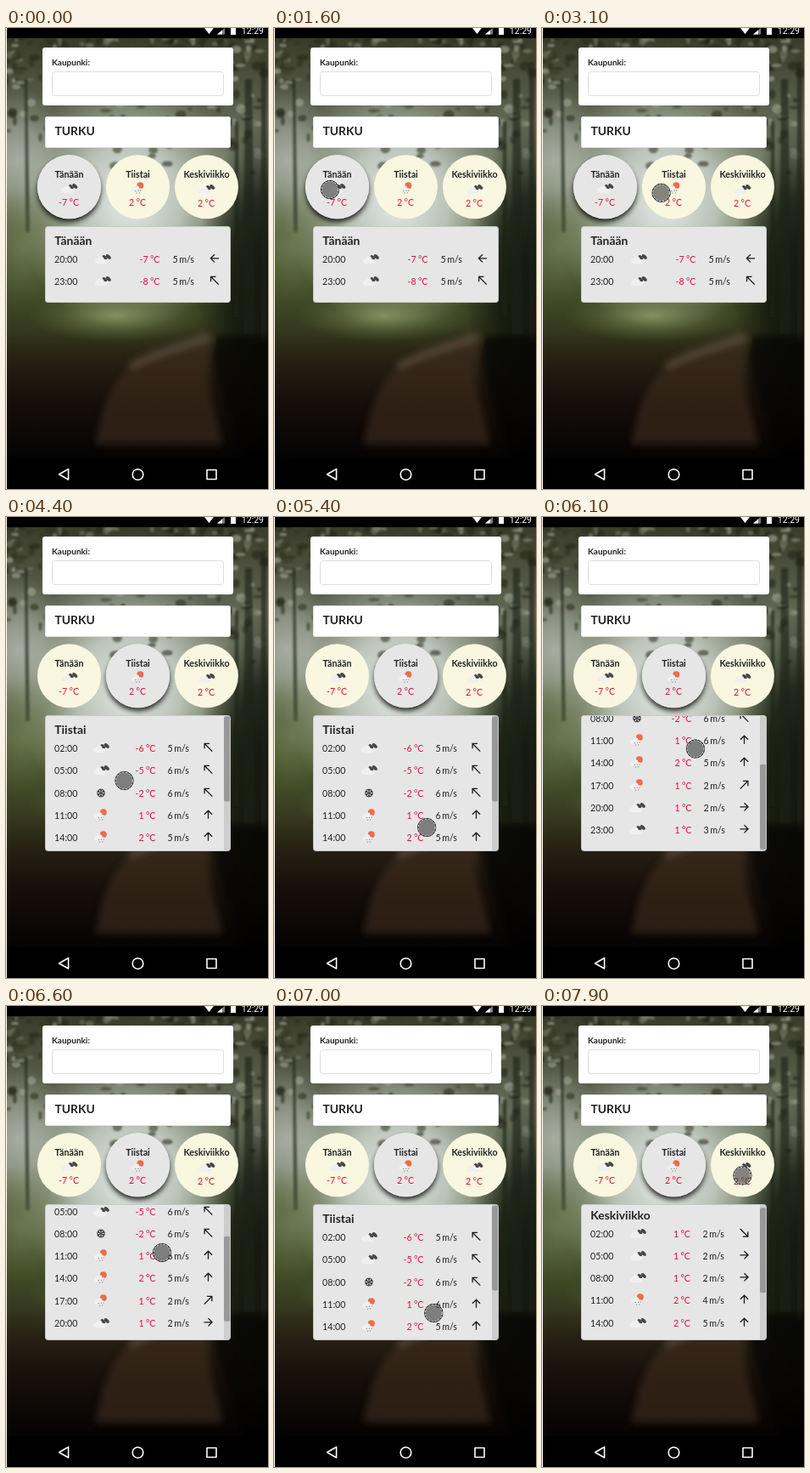
An HTML page for the animation above (8000 ms loop, 309 by 542 pixels).

```html
<!DOCTYPE html>
<html lang="fi">
<head>
<meta charset="utf-8">
<title>Sää</title>
<style>
  html, body { margin: 0; width: 100%; height: 100%; overflow: hidden; background: #000; }
  svg { display: block; }
  text { font: 10.7px Lato, sans-serif; fill: #222; }
  .bold { font-weight: 700; }
  .big { font-size: 13.9px; font-weight: 700; }
  .temp { fill: #dc143c; word-spacing: -.5px; }
  .wind { word-spacing: -1.3px; }
  .end { text-anchor: end; }
  .mid { text-anchor: middle; }
  .arrow { fill: none; stroke: #1a1a1a; stroke-width: 1.3; }
  .nav { fill: none; stroke: #fff; stroke-width: 1.6; stroke-linejoin: round; }
</style>
</head>
<body>
<svg id="stage" width="309" height="542" viewBox="0 0 309 542">
  <defs>
    <linearGradient id="base" gradientUnits="userSpaceOnUse" x1="0" y1="12" x2="0" y2="506">
      <stop offset="0" stop-color="#3a3c2a"/>
      <stop offset=".17" stop-color="#5c604e"/>
      <stop offset=".3" stop-color="#737a66"/>
      <stop offset=".45" stop-color="#5d684a"/>
      <stop offset=".6" stop-color="#434d29"/>
      <stop offset=".69" stop-color="#363a1f"/>
      <stop offset=".76" stop-color="#272214"/>
      <stop offset=".86" stop-color="#170f0a"/>
      <stop offset="1" stop-color="#050303"/>
    </linearGradient>
    <radialGradient id="mist">
      <stop offset="0" stop-color="#e6ecea"/>
      <stop offset=".45" stop-color="#d0d7d0" stop-opacity=".8"/>
      <stop offset="1" stop-color="#aab49c" stop-opacity="0"/>
    </radialGradient>
    <radialGradient id="grass">
      <stop offset="0" stop-color="#8c9868" stop-opacity=".9"/>
      <stop offset="1" stop-color="#5d6e35" stop-opacity="0"/>
    </radialGradient>
    <radialGradient id="shade">
      <stop offset="0" stop-color="#10130b" stop-opacity=".95"/>
      <stop offset=".55" stop-color="#10130b" stop-opacity=".75"/>
      <stop offset="1" stop-color="#10130b" stop-opacity="0"/>
    </radialGradient>
    <filter id="soft" x="-30%" y="-30%" width="160%" height="160%"><feGaussianBlur stdDeviation="4"/></filter>
    <filter id="fine" x="-30%" y="-30%" width="160%" height="160%"><feGaussianBlur stdDeviation=".8"/></filter>
    <filter id="shadow" x="-30%" y="-30%" width="160%" height="160%"><feGaussianBlur stdDeviation="3"/></filter>
    <clipPath id="photoClip"><rect x="1" y="12" width="308" height="494"/></clipPath>
    <clipPath id="listClip"><rect x="47" y="234" width="217" height="158" rx="2"/></clipPath>

    <g id="pale" fill="#f0f0f0">
      <circle cx="-6" cy="2.6" r="3"/><circle cx="-2.2" cy=".8" r="3.7"/><circle cx="2.6" cy="3" r="2.6"/>
      <rect x="-6" y="2" width="9" height="3.6"/>
    </g>
    <g id="cloud">
      <g fill="#454547">
        <ellipse rx="3.2" ry="1.9" transform="translate(2.4 -1.8) rotate(38)"/>
        <ellipse rx="3.6" ry="2" transform="translate(6.8 -2.6) rotate(42)"/>
      </g>
      <use href="#pale"/>
    </g>
    <g id="rain">
      <circle cx="2.8" cy="-3.2" r="4" fill="#eb6e4b"/>
      <use href="#pale" transform="translate(.2 -.6) scale(.9)"/>
      <path d="M-2.4 2.4l-.6 1.2M.8 2.2l-.6 1.2M3.6 2l-.6 1.2M-1.2 5l-.5 1.1M2 4.8l-.5 1.1" stroke="#666" stroke-width=".9"/>
    </g>
    <g id="snow" fill="none" stroke="#3c3c3e" stroke-width="1.1">
      <path id="flake" d="M0-5V5M-2-4.6L0-2.6 2-4.6M-2 4.6L0 2.6 2 4.6"/>
      <use href="#flake" transform="rotate(60)"/><use href="#flake" transform="rotate(120)"/>
    </g>
    <path id="arrow" class="arrow" d="M0 5V-4.4M-4.6 0L0-4.6 4.6 0"/>
    <path id="diagonal" class="arrow" d="M0 6.8V-6M-4.2-2L0-6.2 4.2-2"/>
  </defs>

  <rect width="309" height="542" fill="#000"/>
  <g clip-path="url(#photoClip)">
    <rect y="12" width="309" height="494" fill="url(#base)"/>
    <ellipse cx="145" cy="205" rx="135" ry="150" fill="url(#mist)"/>
    <ellipse cx="15" cy="155" rx="60" ry="85" fill="url(#mist)" opacity=".45"/>
    <g id="leaves" filter="url(#fine)"></g>
    <ellipse cx="310" cy="300" rx="85" ry="190" fill="url(#shade)"/>
    <g filter="url(#fine)" fill="#1d2115" opacity=".6">
      <path d="M282 60h8l4 300h-14zM301 40h6v330h-6zM270 110h4l1 230h-6zM22 60h3l3 180h-5z"/>
    </g>
    <ellipse cx="130" cy="338" rx="105" ry="32" fill="url(#grass)"/>
    <ellipse cx="20" cy="260" rx="60" ry="75" fill="url(#grass)" opacity=".45"/>
    <g filter="url(#soft)">
      <path d="M238 362C215 374 170 382 140 404 116 430 112 460 105 490H255C250 450 224 410 246 362Z" fill="#403022" opacity=".6"/>
      <path d="M240 363C215 372 180 380 146 398" fill="none" stroke="#6d5b49" stroke-width="7" opacity=".7"/>
      <path d="M248 362H315V510H280C264 450 236 400 248 362Z" fill="#0b0906" opacity=".6"/>
    </g>
  </g>
  <rect width="1" height="542" fill="#fff"/>

  <g fill="#fff">
    <path d="M234 0h11l-5.5 7z"/>
    <path d="M249 7.5L258 0V7.5z" opacity=".5"/>
    <path d="M249 7.5L255 2.5V7.5z"/>
    <rect x="265" y="0" width="6" height="8"/>
    <text x="304" y="7.3" class="end" style="font:10.5px Roboto,sans-serif;fill:#fff">12:29</text>
  </g>
  <g class="nav">
    <path d="M73.6 518.5V531L62.6 524.8Z"/><circle cx="155.5" cy="525" r="6.3"/><rect x="237" y="519.5" width="11" height="11"/>
  </g>

  <rect x="43" y="23" width="225" height="68" rx="3" fill="#fff"/>
  <text x="54" y="44" class="bold" style="font-size:10px">Kaupunki:</text>
  <rect x="54.5" y="51.5" width="202" height="28" rx="3" fill="#fff" stroke="#ddd"/>
  <rect x="46" y="104" width="219" height="37" rx="3" fill="#fff"/>
  <rect x="46.5" y="104.5" width="218" height="36" rx="3" fill="none" stroke="#e2e2e2"/>
  <text x="57.4" y="126" class="big">TURKU</text>

  <g id="days"></g>

  <rect id="panel" x="46.5" y="233.5" width="218" height="89" rx="3" fill="#e6e6e6" stroke="#c9c9c9"/>
  <g clip-path="url(#listClip)">
    <g id="lists"></g>
    <g id="bar">
      <rect x="257" y="234" width="8" height="158" fill="#cdcdcd"/>
      <rect id="thumb" x="257" y="234.5" width="7.5" height="100" rx="2.5" fill="#999"/>
    </g>
  </g>

  <g id="touch">
    <circle r="10.8" fill="#464646" fill-opacity=".65"/>
    <circle r="10.6" fill="none" stroke="#1c1c1c" stroke-width="1"/>
    <circle r="9.9" fill="none" stroke="#eee" stroke-width=".9" stroke-dasharray="2 2"/>
  </g>
</svg>

<script>
const $ = id => document.getElementById(id);
const LOOP = 8000, STEP = 100, FADE = 300;
const PICK_TUE = 3400, PICK_WED = 7900;
const ROW = 26.3;

// rows: time, icon, temperature, wind, arrow angle
const days = [
  { name: 'Tänään', icon: 'cloud', temp: -7, cols: [114, 181.5, 222, 246], rows: [
    ['20:00', 'cloud', -7, 5, 270], ['23:00', 'cloud', -8, 5, 315]] },
  { name: 'Tiistai', icon: 'rain', temp: 2, cols: [112, 176.5, 216, 238.5], rows: [
    ['02:00', 'cloud', -6, 5, 315], ['05:00', 'cloud', -5, 6, 315],
    ['08:00', 'snow', -2, 6, 315], ['11:00', 'rain', 1, 6, 0],
    ['14:00', 'rain', 2, 5, 0], ['17:00', 'rain', 1, 2, 45],
    ['20:00', 'cloud', 1, 2, 90], ['23:00', 'cloud', 1, 3, 90]] },
  { name: 'Keskiviikko', icon: 'cloud', temp: 2, cols: [113, 175, 215, 238.5], rows: [
    ['02:00', 'cloud', 1, 2, 135], ['05:00', 'cloud', 1, 2, 90],
    ['08:00', 'cloud', 1, 2, 90], ['11:00', 'rain', 2, 4, 0],
    ['14:00', 'cloud', 2, 5, 0]] }
];

const use = (id, x, y, more = '') => `<use href="#${id}" transform="translate(${x} ${y}) ${more}"/>`;
const label = (s, x, y, cls = '') => `<text x="${x}" y="${y}" class="${cls}">${s}</text>`;

$('days').innerHTML = days.map((d, i) => {
  const x = 74.5 + 81 * i, dy = i === 2 ? 1 : 0;
  return `<g class="on"><circle cx="${x}" cy="191" r="37" filter="url(#shadow)" opacity=".85"/></g>
    <circle cx="${x}" cy="186.8" r="37.5" fill="#f9f7df"/>
    <circle class="on" cx="${x}" cy="186.8" r="37.5" fill="#e6e6e6"/>`
    + label(d.name, x, 176, 'bold mid') + use(d.icon, x, 188.5 + dy)
    + label(d.temp + ' °C', x - .4, 209 + dy, 'temp mid');
}).join('');

// each group is drawn around its own middle line and moved by draw()
$('lists').innerHTML = days.map(d => {
  const [icon, temp, wind, arrow] = d.cols;
  return '<g><g data-y="250">' + label(d.name, 57.3, 5, 'big') + '</g>'
    + d.rows.map(([time, kind, deg, speed, angle], i) =>
      `<g data-y="${272 + ROW * i}">` + label(time, 57, 4) + use(kind, icon, -.5)
      + label(deg + ' °C', temp, 4, 'temp end') + label(speed + ' m/s', wind, 4, 'wind end')
      + use(angle % 90 ? 'diagonal' : 'arrow', arrow, -1.2, `rotate(${angle})`) + '</g>').join('') + '</g>';
}).join('');

// dark and pale foliage in the upper part of the photo
let seed = 7;
const rnd = () => (seed = seed * 16807 % 2147483647) / 2147483647;
const tones = ['#1f2316', '#2b2f1d', '#a3a997', '#353a24', '#737862'];
$('leaves').innerHTML = Array.from({ length: 260 }, (_, i) =>
  `<ellipse cx="${rnd() * 309}" cy="${12 + rnd() * rnd() * 190}" rx="${2 + rnd() * 5}" ry="${1.5 + rnd() * 4}" fill="${tones[i % 5]}" opacity=".6"/>`).join('');

const path = [
  [1300, 157, 191], [1400, 59, 190.5], [1500, 59, 190.5], [1600, 66, 190], [1700, 74, 188.7],
  [3000, 74, 188.7], [3100, 140.6, 193.8], [4100, 140.6, 193.8], [4200, 141, 212], [4300, 142, 268],
  [4400, 139.5, 310], [4600, 141, 309], [4800, 141, 309], [4900, 160, 385], [5000, 170, 411],
  [5200, 176, 180], [5400, 180.2, 365], [5600, 182, 382], [5700, 182, 372], [6000, 181, 286],
  [6100, 181, 272.5], [6300, 181, 258], [6600, 184, 290], [7000, 188.3, 361], [7100, 190, 384],
  [7200, 203, 362], [7500, 246, 219.5], [7600, 240, 206], [7700, 236.4, 199.4]
];
const scrolls = [
  [5000, 0], [5100, 88], [5200, 88], [5400, 0], [5700, 0], [6000, 86], [6100, 88],
  [6400, 88], [6900, 10], [7000, 0], [7100, 0], [7200, 4.45]
];

function at(keys, t) {
  const n = keys.findIndex(k => k[0] > t);
  if (n < 0) return keys[keys.length - 1].slice(1);
  if (n === 0) return keys[0].slice(1);
  const a = keys[n - 1], b = keys[n], p = (t - a[0]) / (b[0] - a[0]);
  return a.slice(1).map((v, i) => v + (b[i + 1] - v) * p);
}

const fade = (t, start) => {
  const p = Math.min(1, Math.max(0, (t - start) / FADE));
  return p * p * (3 - 2 * p);
};
const marks = [...document.querySelectorAll('.on')];
const lists = [...$('lists').children];

function draw(now) {
  const t = Math.floor(now % LOOP / STEP) * STEP;
  const day = t < PICK_TUE ? 0 : t < PICK_WED ? 1 : 2;
  const tue = fade(t, PICK_TUE), wed = fade(t, PICK_WED);
  const level = [1 - tue, tue - wed, wed];
  marks.forEach((m, i) => m.setAttribute('opacity', level[i >> 1]));

  const [scroll] = at(scrolls, t);
  lists.forEach((g, i) => g.style.display = i === day ? '' : 'none');
  for (const row of lists[day].children)
    row.setAttribute('transform', `translate(0 ${Math.round(row.dataset.y - scroll)})`);
  $('panel').setAttribute('height', day ? 159 : 89);
  $('bar').style.display = day ? '' : 'none';
  $('thumb').setAttribute('y', 234.5 + scroll * .64);

  const [x, y] = at(path, t);
  $('touch').style.display = t < path[0][0] ? 'none' : '';
  $('touch').setAttribute('transform', `translate(${x} ${y})`);
}

const start = performance.now();
function tick() {
  draw(performance.now() - start);
  requestAnimationFrame(tick);
}
tick();
</script>
</body>
</html>
```
